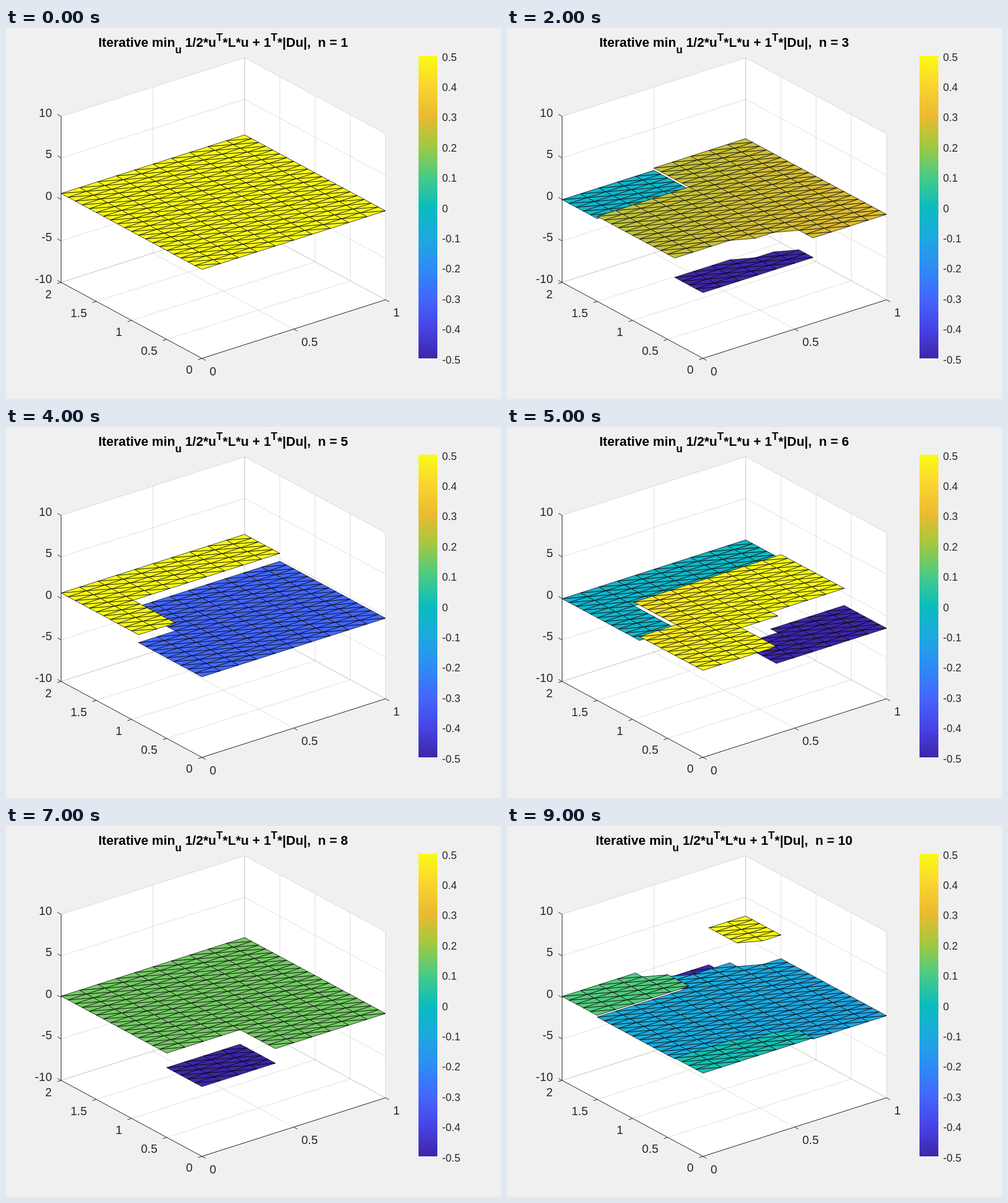
Recreate the animation shown at these times as an HTML page with a canvas. Size 840 by 630 pixels, loop 10 s.

```html
<!DOCTYPE html>
<html lang="en">
<head>
<meta charset="utf-8">
<title>Iterative minimisation</title>
<style>
  html, body { margin: 0; width: 100%; height: 100%; overflow: hidden; background: #f0f0f0; }
  canvas { display: block; }
</style>
</head>
<body>
<canvas id="stage" width="840" height="630"></canvas>
<script>
const ctx = document.getElementById('stage').getContext('2d');
const FONT = '"Liberation Sans", Arial, sans-serif';
const INK = '#262626';
const NX = 10, NY = 20, STEP = 1000;

// Key colours of the scale from -0.5 to 0.5
const STOPS = '3e26a8 4743e7 4367fd 2d8cf3 1caadf 0abcbe 48cb86 9fc942 eaba30 fad42e f9fb15'
  .split(' ').map(h => [0, 2, 4].map(k => parseInt(h.slice(k, k + 2), 16)));

function colour(v) {
  const p = Math.min(1, Math.max(0, v + 0.5)) * (STOPS.length - 1);
  const k = Math.min(STOPS.length - 2, Math.floor(p));
  const mix = STOPS[k].map((c, n) => Math.round(c + (STOPS[k + 1][n] - c) * (p - k)));
  return `rgb(${mix})`;
}

// Grid position (i, j) and height z to stage pixels
const project = (i, j, z) =>
  [332.5 + 31.15 * i - 11.95 * j, 420 - 9.95 * i - 6.45 * j - 14.1 * z];

// Parts of the grid, as rules on a triangle's centre
const front = (i, j) => i < 6 && j < 4 && i + 2 * j < 10.5;
const left = (i, j) => i < 5 && j > 15;
const back = (i, j) => i > 4 && j > 17 && i + j > 23;
const ell = (i, j) => j > 15 || (i < 2 && j > 9);
const right = (i, j) => (i > 4 && j < 5) || (i > 6 && j < 6);
const near = (i, j) => i < 4 && j < 5;
const rest = () => true;

// A patch leans along x - y by its tilt
const patch = (covers, base, tilt = 0) =>
  ({ covers, height: (i, j) => base + tilt * (i / NX - j / NY) });

// In each scene the first patch that covers a triangle wins
const SCENES = [
  [patch(rest, 0.71)],
  [patch(left, -2), patch(rest, 0.28)],
  [patch(left, -0.04), patch(front, -2.08), patch(rest, 0.26, 0.03)],
  [patch(back, 2.41), patch(front, 0.02), patch(rest, -0.24, -0.06)],
  [patch(ell, 0.65), patch(rest, -0.3)],
  [patch(ell, -0.02, 0.03), patch(right, -1.51), patch(rest, 0.48, 0.1)],
  [
    patch((i, j) => i < 4 && j > 17, 0.94),
    patch((i, j) => i < 2 && j > 13 && j < 17 && i + j < 18, -3.42),
    patch((i, j) => back(i, j) && !left(i, j), -0.04),
    patch(front, -0.04),
    patch(rest, 0.1, 0.02)
  ],
  [patch(near, -1.6), patch(rest, 0.15)],
  [
    patch((i, j) => i > 9 && j < 1, -9.92),
    patch(near, -0.08),
    patch((i, j) => right(i, j) && i < 5, 0.1),
    patch(right, 0.31),
    patch(rest, 0.01, 0.01)
  ],
  [
    patch((i, j) => i > 8 && j > 15 && i + j > 24, 2.74),
    patch(back, -1.72),
    patch(left, 0.11),
    patch(front, 0.02),
    patch(rest, -0.1, -0.02)
  ]
];

function path(points) {
  ctx.beginPath();
  points.forEach(p => ctx.lineTo(p[0], p[1]));
}

function line(a, b) {
  path([a, b]);
  ctx.stroke();
}

function label(text, x, y, size, align) {
  ctx.font = `${size}px ${FONT}`;
  ctx.textAlign = align;
  ctx.fillStyle = INK;
  ctx.fillText(text, x, y);
}

function drawWalls() {
  ctx.fillStyle = '#fff';
  path([project(0, NY, 10), project(NX, NY, 10), project(NX, 0, 10),
    project(NX, 0, -10), project(0, 0, -10), project(0, NY, -10)]);
  ctx.fill();
  ctx.strokeStyle = 'rgba(38,38,38,0.15)';
  for (let i = 0; i <= NX; i += 5) {
    line(project(i, NY, -10), project(i, NY, 10));
    line(project(i, 0, -10), project(i, NY, -10));
  }
  for (let j = 0; j <= NY; j += 5) {
    line(project(NX, j, -10), project(NX, j, 10));
    line(project(0, j, -10), project(NX, j, -10));
  }
  for (let z = -10; z <= 10; z += 5) {
    line(project(0, NY, z), project(NX, NY, z));
    line(project(NX, NY, z), project(NX, 0, z));
  }
}

function drawAxes() {
  const tick = ([x, y], dx, dy) => line([x, y], [x + dx, y + dy]);
  ctx.strokeStyle = INK;
  path([project(0, NY, 10), project(0, NY, -10), project(0, 0, -10), project(NX, 0, -10)]);
  ctx.stroke();
  for (let k = 0; k < 5; k++) {
    const z = 10 - 5 * k;
    tick(project(0, NY, z), -6.2, -3.4);
    label(z, 78, 150.5 + 70.5 * k, 20, 'right');
    tick(project(0, NY - 5 * k, -10), -6.7, 2.1);
    label(2 - k / 2, 77.5 + 59.75 * k, 459 + 32.1 * k, 20, 'right');
  }
  for (let k = 0; k < 3; k++) {
    tick(project(5 * k, 0, -10), 6.2, 3.4);
    label(k / 2, 345.5 + 155.7 * k, 590 - 49.8 * k, 20, 'left');
  }
}

function drawBar() {
  const ramp = ctx.createLinearGradient(0, 561, 0, 47);
  STOPS.forEach((c, k) => ramp.addColorStop(k / (STOPS.length - 1), `rgb(${c})`));
  ctx.fillStyle = ramp;
  ctx.fillRect(700, 47, 32, 514);
  for (let k = 0; k <= 10; k++) label((5 - k) / 10, 740, 55.5 + 51.4 * k, 18, 'left');
}

function drawTitle(n) {
  const parts = [['Iterative min', 0], ['u', 11], [' 1/2*u', 0], ['T', -10],
    ['*L*u + 1', 0], ['T', -10], ['*|Du|,  n = ' + n, 0]];
  const setFont = shift => { ctx.font = `bold ${shift ? 18 : 22.1}px ${FONT}`; };
  const widths = parts.map(([text, shift]) => {
    setFont(shift);
    return ctx.measureText(text).width;
  });
  let x = 368.5 - widths.reduce((a, b) => a + b) / 2;
  ctx.textAlign = 'left';
  ctx.fillStyle = '#000';
  parts.forEach(([text, shift], k) => {
    setFont(shift);
    ctx.fillText(text, x, 32 + shift);
    x += widths[k];
  });
}

function drawTriangle(scene, corners) {
  const [ci, cj] = [0, 1].map(k => corners.reduce((sum, c) => sum + c[k], 0) / 3);
  const { height } = scene.find(p => p.covers(ci, cj));
  path(corners.map(([i, j]) => project(i, j, height(i, j))));
  ctx.closePath();
  ctx.fillStyle = colour(height(ci, cj));
  ctx.fill();
  ctx.stroke();
}

// Cells go from far to near so that near ones cover far ones
function drawSurface(scene) {
  ctx.strokeStyle = '#000';
  ctx.lineWidth = 0.75;
  for (let i = NX - 1; i >= 0; i--) {
    for (let j = NY - 1; j >= 0; j--) {
      drawTriangle(scene, [[i + 1, j], [i + 1, j + 1], [i, j + 1]]);
      drawTriangle(scene, [[i, j], [i + 1, j], [i, j + 1]]);
    }
  }
}

function draw(index) {
  ctx.fillStyle = '#f0f0f0';
  ctx.fillRect(0, 0, 840, 630);
  ctx.lineWidth = 1;
  ctx.lineJoin = 'round';
  drawWalls();
  drawAxes();
  drawSurface(SCENES[index]);
  drawBar();
  drawTitle(index + 1);
}

const start = performance.now();
let shown = -1;
function tick() {
  const index = Math.floor((performance.now() - start) / STEP) % SCENES.length;
  if (index !== shown) draw(shown = index);
  requestAnimationFrame(tick);
}
tick();
</script>
</body>
</html>
```
